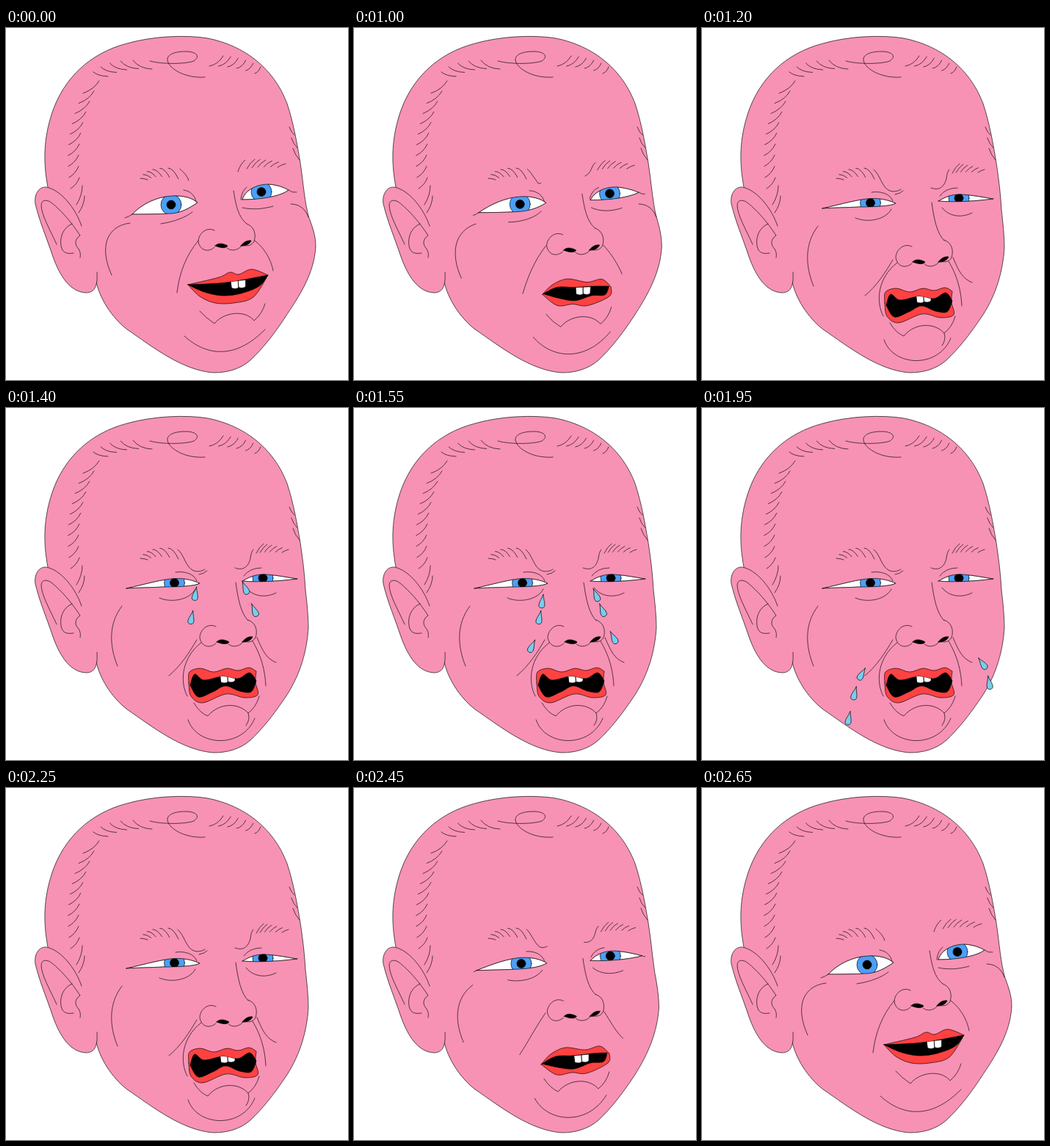
Write an HTML page that moves like this. It is 466 px wide and 480 px high and loops after 3.05 s.

```html
<!DOCTYPE html>
<html lang="en">
<head>
<meta charset="utf-8">
<title>Moody baby</title>
<style>
  html, body { margin: 0; height: 100%; overflow: hidden; background: #fff; }
  svg { display: block; width: 100vw; height: 100vh; }
  path, circle { fill: none; stroke: #000; stroke-width: .65; stroke-linecap: round; stroke-linejoin: round; }
  .skin { fill: #f792b5; }
  .white { fill: #fff; }
  .iris { fill: #4c9ff6; }
  .black { fill: #000; }
  .lips { fill: #fe4242; }
  .tear { fill: #78cdee; }
</style>
</head>
<body>
<svg viewBox="0 0 466 480" xmlns="http://www.w3.org/2000/svg">
  <defs>
    <path id="leftTrack"/>
    <path id="rightTrack"/>
  </defs>
  <g id="faces"></g>
  <g>
    <path class="skin" d="M103 270C95 246 75 221 55 217C44 216 38 228 40 240C46 265 55 285 64 312C74 340 88 360 109 361C122 361 125 350 124 333"/>
    <path d="M69 295C60 275 48 255 48 241C49 233 57 234 63 239C75 249 88 263 101 283C93 288 94 296 98 300C101 304 102 308 101 313M90 267C78 272 73 285 75 297C77 308 84 308 92 307"/>
    <path d="M196 45C215 50 245 49 256 45C266 38 258 32 245 32C230 32 219 36 220 44C222 56 245 69 271 67"/>
    <path id="hair"/>
  </g>
  <g id="tears"></g>
</svg>
<script>
const LOOP = 3050, STEP = 50;
const $ = id => document.getElementById(id);
const mix = (a, b, k) => a + (b - a) * k;

// Blends two paths that share the same commands.
function blend([from, to], k) {
  const number = /-?\d+(\.\d+)?/g, goal = to.match(number);
  let i = 0;
  return from.replace(number, n => mix(+n, +goal[i++], k).toFixed(1));
}

// A row of short strokes rooted along a quadratic guide; reach is the stroke
// vector at both ends, bend its control point as a share of that vector.
function hairs(count, [a, guide, b], [first, last], bend) {
  return Array.from({ length: count }, (_, i) => {
    const k = i / (count - 1);
    const root = [0, 1].map(n => mix(mix(a[n], guide[n], k), mix(guide[n], b[n], k), k).toFixed(1));
    const tip = [0, 1].map(n => +mix(first[n], last[n], k).toFixed(1));
    const knee = tip.map((v, n) => (v * bend[n]).toFixed(1));
    return `M${root.join(' ')}q${knee.join(' ')} ${tip.join(' ')}`;
  }).join('');
}

// Smooth curve through "x,y" points, continuing the current path.
function smooth(text) {
  const p = text.split(' ').map(s => s.split(',').map(Number));
  const at = i => p[Math.max(0, Math.min(p.length - 1, i))];
  const handle = (a, b, c) => [0, 1].map(n => a[n] + (c[n] - b[n]) / 6);
  return p.slice(1).map((end, i) =>
    'C' + [handle(p[i], at(i - 1), end), handle(end, at(i + 2), p[i]), end].join(' ')).join('');
}
const trail = text => 'M' + text.split(' ')[0] + smooth(text);
const ring = ([top, bottom]) => trail(top) + smooth(bottom) + 'Z';

$('hair').setAttribute('d',
  hairs(10, [[105, 89], [76, 150], [88, 219]], [[22, -17], [12, -15]], [.7, .33]) +
  hairs(2, [[96, 241], [97, 246], [99, 252]], [[8, -26], [8, -23]], [1, .5]) +
  hairs(5, [[119, 60], [137, 44], [173, 44]], [[20, 6], [26, 12]], [.33, .95]) +
  hairs(6, [[277, 52], [308, 51], [339, 62]], [[19, -14], [8, -9]], [.63, .15]) +
  hairs(3, [[386, 135], [389, 150], [391, 164]], [[7, 11], [9, 16]], [.3, .6]) +
  hairs(6, [[183, 205], [190, 190], [221, 191]], [[10, 2], [14, 15]], [.5, 0]));

// Each pair is [smiling, crying].
const SKULL = 'M57 217C50 180 52 150 62 118C78 68 115 34 165 21C200 11 245 9 275 14C325 24 365 55 383 103C392 130 397 160 401 184';
const CHIN = 'C365 418 350 437 333 453C318 466 300 470 283 470C240 467 200 435 165 411C143 394 127 367 123 346';
const head = [
  SKULL + 'C405 210 407 240 413 259C419 275 422 285 422 298C420 335 400 365 380 395' + CHIN,
  SKULL + 'C405 210 407 230 408 248C410 265 412 285 412 300C410 330 402 361 383 391' + CHIN
];
const eyes = [
  { lid: ['M172 254C185 240 205 230 226 229C243 228 254 232 261 238C248 247 238 252 225 253C205 254 185 254 172 254Z',
          'M164 246C190 240 215 233 230 232.5C245 232 255 235 264 239C258 243 235 244 215 244C195 245 180 245 164 246Z'],
    pupil: ['225 241', '229.5 238.5'] },
  { lid: ['M322 234C325 222 340 213 358 213C370 214 378 217 385 221C375 229 350 234 322 234Z',
          'M322 236C332 230 342 226 355 227C370 228 385 231 397 233C375 236 345 238 322 236Z'],
    pupil: ['348 223.5', '350 232'] }
];
const creases = [
  // brows
  ['M237 192C240 195 247 201 249 208C249 208 249 208 249 208', 'M234 193C243 200 245 218 256 222C262 224 268 222 271 220'],
  ['M316 196C317 192 319 189 320 187Q322 183 326 180', 'M312 218C322 222 330 218 333 205Q334 196 337 193'],
  [hairs(6, [[328, 192], [345, 188], [370, 190]], [[11, -13], [11, -5]], [.45, .7]),
   hairs(6, [[341, 198], [353, 195], [376, 197]], [[10, -13], [9, -4]], [.45, .7])],
  // around the eyes
  ['M162 259Q168 257 172 254', 'M164 246Q164 246 164 246'],
  ['M385 221Q390 225 396 224', 'M397 233Q397 233 397 233'],
  ['M242 221C252 222 258 230 259 237', 'M231 224C243 222 257 226 260 236'],
  ['M211 267C230 264 245 258 254 251', 'M209 259C225 266 250 262 258 247'],
  ['M320 234Q321 222 328 217', 'M324 229Q332 218 348 218'],
  ['M322 245C335 248 350 247 364 243', 'M327 245C337 258 355 259 368 252'],
  // bridge and cheeks
  ['M310 222C313 240 316 258 328 267', 'M313 238C316 260 320 280 330 290'],
  ['M262 290C245 310 236 335 233 361', 'M260 316C250 333 238 352 222 365'],
  ['M339 290C352 300 361 315 364 331', 'M342 313C350 332 355 342 368 347'],
  ['M169 266C136 270 127 300 144 337', 'M158 270C139 295 141 325 152 352'],
  // chin
  ['M264 386Q272 395 284 403C297 387 326 384 338 399Q349 390 353 376', 'M256 402Q264 416 275 420C290 402 316 401 330 416Q341 408 345 393'],
  ['M243 420C270 445 310 455 353 411', 'M248 425C260 462 322 465 339 423']
];
const CRYING_LINES = 'M263 227Q270 226 274 222M266 320C240 340 236 372 247 393M336 318C348 338 353 358 354 379M330 416Q333 425 327 433';
const SMILING_LINES = 'M388 240C400 240 408 247 412 258';
const NOSE = 'M284 276C272 270 262 282 262 291C264 303 275 307 284 299M301 300C308 306 318 302 322 296M328 267C339 271 341 282 338 291C335 297 328 298 322 296';
const NOSTRILS = 'M285 297C289 292 297 294 302 297C300 301 292 300 285 297ZM320 297C323 293 328 289 334 290C333 294 326 298 320 297Z';
const TEETH = 'M-10 -4L0 -5L.5 4Q-1 6-4 6T-9 5ZM0 -5L10 -6L10 3Q8 5 5 5T.5 4Z';

const smile = {
  lips: ['248,350 290,340 305,333 317,336 335,329 357,337', '357,337 337,367 310,375 285,375 264,366 248,350'],
  gap: ['248,350 300,347 357,337', '357,337 345,352 320,362 295,365 270,360 248,350'],
  teeth: '316.5 349.5'
};
const pout = {
  lips: ['255,377 268,363 288,354 315,357 335,352 348,362', '348,362 346,375 317,389 297,388 276,391 255,377'],
  gap: ['256,376 275,366 298,365 325,362 345,361', '345,361 340,373 322,375 300,383 278,381 256,376'],
  teeth: '310 369'
};
const wail = {
  lips: ['249,375 250,360 265,355 283,360 301,355 316,358 331,354 341,359', '341,359 340,374 343,391 325,395 300,390 268,402 252,393 249,375'],
  gap: ['251,378 257,363 270,371 295,366 316,369 332,361 341,372', '341,372 334,387 318,386 299,379 282,387 262,394 251,378'],
  teeth: '302 369'
};
const moods = {
  happy: { sorrow: 0, mouth: smile },
  uneasy: { sorrow: .27, mouth: pout, move: 'translate(2 -11) rotate(3 305 370)' },
  upset: { sorrow: .65, mouth: pout },
  crying: { sorrow: 1, mouth: wail }
};

const path = (d, kind = '', move = '') => `<path class="${kind}" d="${d}" transform="${move}"/>`;
const clipped = (id, d, content) =>
  `<clipPath id="${id}"><path d="${d}"/></clipPath><g clip-path="url(#${id})">${content}</g>`;

function drawEye({ lid, pupil }, k, id) {
  const d = blend(lid, k);
  const ball = `<g transform="translate(${blend(pupil, k)})"><circle class="iris" r="14"/><circle class="black" r="6"/></g>`;
  return clipped(id, d, path(d, 'white') + ball) + path(d);
}

function drawMouth({ lips, gap, teeth }, move = '', id) {
  const d = ring(gap);
  return `<g transform="${move}">` + path(ring(lips), 'lips') + path(d, 'black') +
    clipped(id, d, path(TEETH, 'white', `translate(${teeth})`)) + '</g>';
}

function drawFace([name, { sorrow, mouth, move }]) {
  const noseDrop = `translate(${2 * sorrow} ${22 * sorrow})`;
  return `<g id="${name}">` + path(blend(head, sorrow), 'skin') +
    eyes.map((eye, i) => drawEye(eye, sorrow, name + i)).join('') +
    creases.map(pair => path(blend(pair, sorrow))).join('') +
    (sorrow === 1 ? path(CRYING_LINES) : '') + (sorrow < .5 ? path(SMILING_LINES) : '') +
    path(NOSE, '', noseDrop) + path(NOSTRILS, 'black', noseDrop) +
    drawMouth(mouth, move, name + 'Mouth') + '</g>';
}
$('faces').innerHTML = Object.entries(moods).map(drawFace).join('');

$('leftTrack').setAttribute('d', trail('258,254 252,290 242,326 216,366 206,397 198,433'));
$('rightTrack').setAttribute('d', trail('326,246 341,282 357,319 384,351 391,373 393,390'));
const FALL = 750, FALL_LENGTH = 192, TEARS_END = 2250;
const tears = ['leftTrack', 'rightTrack'].flatMap(id =>
  [1250, 1400, 1500].map(birth => ({ track: $(id), birth })));
$('tears').innerHTML = tears.map(() =>
  path('M0 -10C1 -4 4 0 4 4.5A4 4 0 0 1 -4 4.5C-4 0 -1 -4 0 -10Z', 'tear')).join('');

function drawTear({ track, birth }, el, t) {
  const k = (t - birth) / FALL;
  const run = FALL_LENGTH * k - 6 * Math.sin(2 * Math.PI * k);
  const visible = k >= 0 && k <= 1 && t < TEARS_END && run <= track.getTotalLength() + 2;
  el.style.display = visible ? '' : 'none';
  if (!visible) return;
  const { x, y } = track.getPointAtLength(run);
  const a = track.getPointAtLength(run - 4), b = track.getPointAtLength(run + 4);
  const tilt = Math.atan2(a.x - b.x, b.y - a.y) * 180 / Math.PI;
  el.setAttribute('transform', `translate(${x} ${y}) rotate(${tilt})`);
}

const schedule = [[0, 'happy'], [1000, 'uneasy'], [1100, 'upset'], [1200, 'crying'], [2450, 'upset'], [2550, 'uneasy'], [2650, 'happy']];

function draw(now) {
  const t = Math.floor(now % LOOP / STEP) * STEP;
  const mood = schedule.filter(([start]) => start <= t).pop()[1];
  for (const name in moods) $(name).style.display = name === mood ? '' : 'none';
  tears.forEach((tear, i) => drawTear(tear, $('tears').children[i], t));
}

const began = performance.now();
function tick() {
  draw(performance.now() - began);
  requestAnimationFrame(tick);
}
tick();
</script>
</body>
</html>
```
